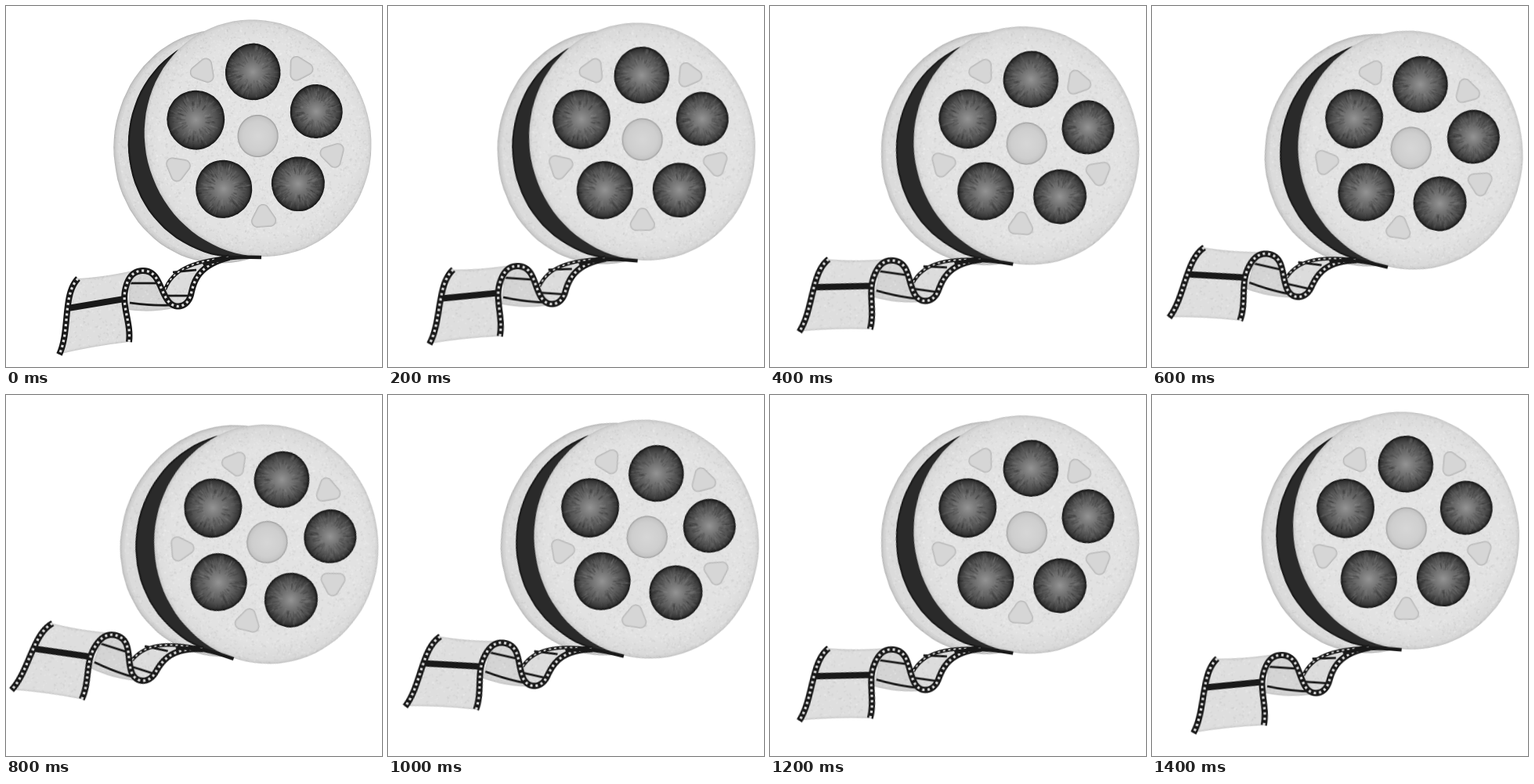
An HTML page with a canvas that plays this animation: 480 by 461 pixels, repeating every 1600 ms.

```html
<!DOCTYPE html>
<html lang="en">
<head>
<meta charset="utf-8">
<title>Film reel</title>
<style>
  html, body { margin: 0; width: 100%; height: 100%; overflow: hidden; background: #fff; }
  canvas { display: block; width: 480px; height: 461px; transform-origin: 257px 215px; }
</style>
</head>
<body>
<canvas id="reel" width="960" height="922"></canvas>
<script>
const canvas = document.getElementById('reel');
const ctx = canvas.getContext('2d');
const RAD = Math.PI / 180;
const INK = '#191919';
const HUB = { x: 321.5, y: 166 };
ctx.scale(2, 2);

let seed = 11;
const rand = () => {
  seed = (seed * 16807) % 2147483647;
  return seed / 2147483647;
};
const span = (a, b) => a + (b - a) * rand();
const gray = (v, a = 1) => `rgba(${v},${v},${v},${a})`;

function fill(path, style) {
  ctx.fillStyle = style;
  ctx.fill(path);
}

function stroke(path, style, width) {
  ctx.strokeStyle = style;
  ctx.lineWidth = width;
  ctx.stroke(path);
}

function inside(path, draw) {
  ctx.save();
  ctx.clip(path);
  draw();
  ctx.restore();
}

// Soft dark rim kept inside the shape.
function rim(path, v, alpha, width) {
  inside(path, () => {
    for (let w = width; w > 0.5; w *= 0.6) stroke(path, gray(v, alpha), w);
  });
}

function glow(x, y, r, mid, half, end) {
  const g = ctx.createRadialGradient(x, y, 0, x, y, r);
  g.addColorStop(0, gray(mid));
  g.addColorStop(0.7, gray(half));
  g.addColorStop(1, gray(end));
  return g;
}

// Ellipse with a slightly uneven, hand-painted outline.
function blob(x, y, rx, ry, tilt = 0, rough = 0.003) {
  const path = new Path2D(), phase = span(0, 6);
  const cos = Math.cos(tilt * RAD), sin = Math.sin(tilt * RAD);
  for (let d = 0; d < 360; d += 4) {
    const a = d * RAD;
    const k = 1 + rough * (Math.sin(3 * a + phase) + span(-0.6, 0.6));
    const u = rx * k * Math.cos(a), v = ry * k * Math.sin(a);
    path.lineTo(x + u * cos - v * sin, y + u * sin + v * cos);
  }
  path.closePath();
  return path;
}

function grain(path, count) {
  inside(path, () => {
    for (let i = 0; i < count; i++) {
      const dot = new Path2D();
      dot.ellipse(span(60, 470), span(15, 450), span(0.6, 2), span(0.5, 1.3), span(0, 3), 0, 7);
      fill(dot, rand() < 0.5 ? gray(255, 0.16) : gray(70, 0.05));
    }
  });
}

function drawReel() {
  const rear = blob(273.5, 180, 136, 149);
  const band = blob(296.5, 177, 141, 144);
  const face = blob(321.5, 169, 143, 153, -25, 0.002);

  fill(rear, gray(219));
  grain(rear, 7000);
  rim(rear, 120, 0.07, 12);
  fill(band, gray(42));
  rim(band, 15, 0.3, 5);
  fill(face, glow(HUB.x, 169, 180, 228, 226, 205));
  grain(face, 12000);
  rim(face, 130, 0.06, 8);
}

function drawHole(x, y, rx, ry) {
  const path = blob(x, y, rx, ry, 0, 0.008);
  fill(path, glow(x, y, rx * 1.05, 148, 80, 36));
  inside(path, () => {
    for (let i = 0; i < 170; i++) {
      const a = span(0, 2 * Math.PI), r = span(0.3, 0.85) * rx, end = r + span(3, 9);
      const ray = new Path2D();
      ray.moveTo(x + r * Math.cos(a), y + r * Math.sin(a));
      ray.lineTo(x + end * Math.cos(a), y + end * Math.sin(a));
      stroke(ray, rand() < 0.55 ? gray(15, 0.15) : gray(175, 0.11), span(0.8, 2.2));
    }
  });
  rim(path, 18, 0.25, 6);
}

// Rounded triangle with its tip towards the hub.
function drawWedge(angle) {
  ctx.save();
  ctx.translate(HUB.x, HUB.y);
  ctx.rotate(angle);
  ctx.translate(103 - 6 * Math.cos(angle), 0);
  const path = new Path2D();
  path.moveTo(14, 0);
  path.arcTo(14, 22, -23, 0, 8);
  path.arcTo(-23, 0, 14, -22, 8);
  path.arcTo(14, -22, 14, 0, 8);
  path.closePath();
  fill(path, gray(214));
  rim(path, 130, 0.13, 4);
  ctx.restore();
}

function drawDetails() {
  for (let i = 0; i < 5; i++) {
    const a = (72 * i - 94) * RAD;
    const rx = 35 - 1.8 * Math.cos(a);
    drawHole(HUB.x - 0.6 + 81 * Math.cos(a), HUB.y - 1 + 81 * Math.sin(a), rx, rx + 1);
    drawWedge(a + 36 * RAD);
  }
  const hub = blob(HUB.x, HUB.y, 26, 27);
  fill(hub, glow(HUB.x, HUB.y, 27, 215, 207, 193));
  rim(hub, 110, 0.13, 4);
}

function panel(d, v) {
  const path = new Path2D(d);
  fill(path, gray(v));
  grain(path, 9000);
  rim(path, 140, 0.06, 6);
}

const bar = (d, width) => stroke(new Path2D(d), INK, width);

// Black film edge with sprocket holes.
function edge(d, width) {
  bar(d, width);
  ctx.setLineDash([3, 3.8]);
  stroke(new Path2D(d), gray(222), width * 0.4);
  ctx.setLineDash([]);
}

function drawFilm() {
  const left = 'M92 348C72 368 82 415 68 445';
  const wave = 'C160 405 148 385 152 363C156 343 165 338 175 338'
    + 'C196 338 196 364 208 378C217 388 232 384 236 369C240 350 246 331 285 321';

  panel('M158 345Q175 330 192 346L214 386Q185 392 156 388Z', 212);
  bar('M158 354L193 354M158 379Q186 383 212 382', 2.8);

  panel('M203 362C212 338 236 326 285 321C246 331 240 350 236 369C230 388 212 386 203 362Z', 220);
  bar('M206 370L236 370M213 340L243 337', 2.8);
  edge('M203 362C212 338 236 326 285 321', 4.4);

  panel('M92 348Q130 346 175 335C156 343 148 385 157 429Q112 434 66 445C82 415 72 368 92 348Z', 222);
  bar('M79 386L151 374', 8);

  edge(left, 8);
  edge('M157 429' + wave, 8);
  bar('M252 331Q278 319 326 321', 4.5);
}

drawReel();
drawDetails();
drawFilm();

// The reel rocks there and back, each pose held for one step.
const poses = Array.from({ length: 9 }, (_, i) => {
  const k = 4 - Math.abs(4 - i);
  return { transform: `rotate(${3.7 * k + 0.18 * k * k}deg)`, easing: 'steps(1, end)' };
});
canvas.animate(poses, { duration: 1600, iterations: Infinity });
</script>
</body>
</html>
```
